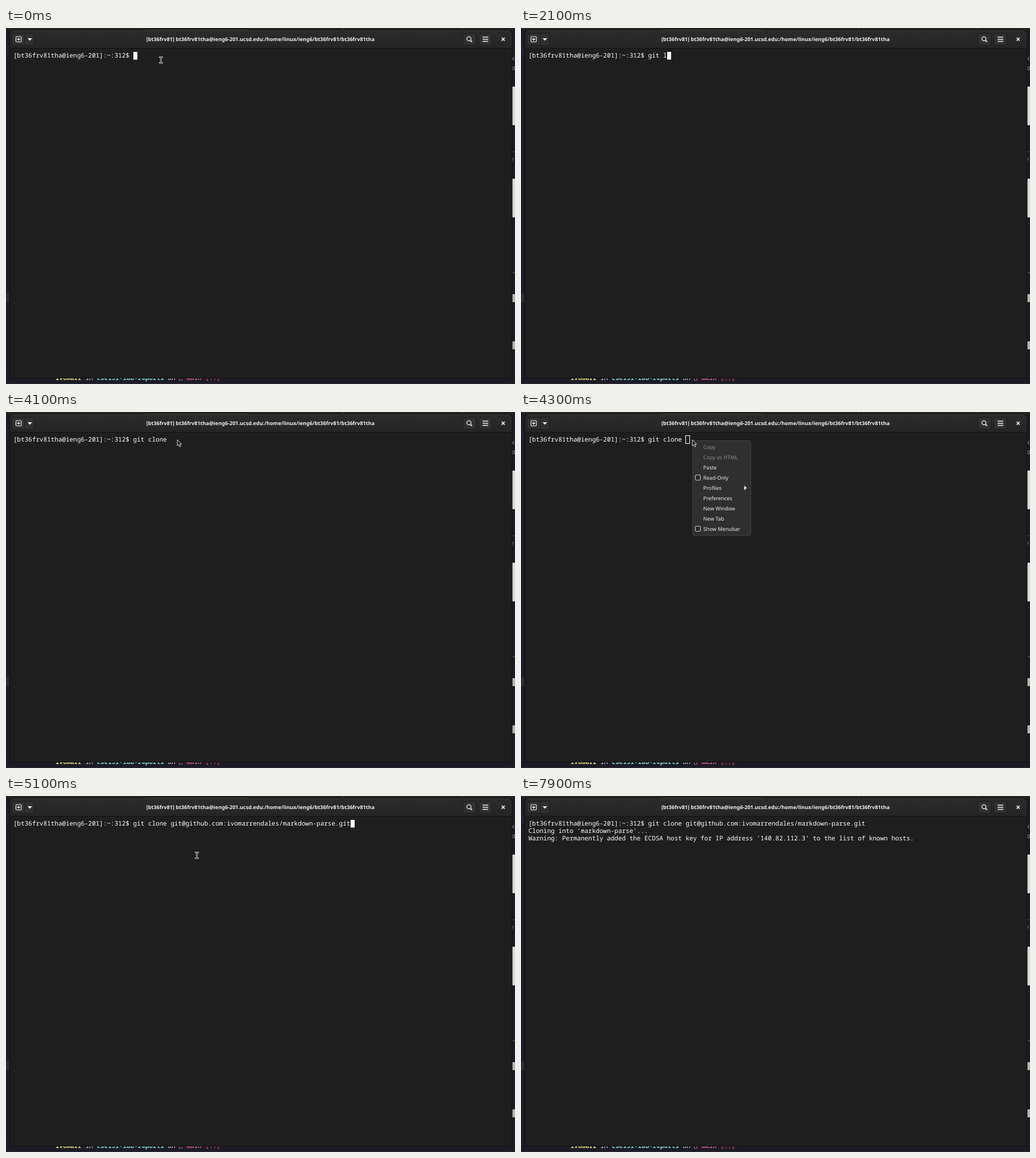
An HTML page for the animation above (8000 ms loop, 895 px wide and 626 px high).

```html
<!DOCTYPE html>
<html lang="en">
<head>
<meta charset="utf-8">
<title>Terminal</title>
<style>
  html, body { margin: 0; width: 100%; height: 100%; overflow: hidden; background: #1b1c26; }
  svg { display: block; }
  text { white-space: pre; text-rendering: geometricPrecision; }
  .mono { font: 10.98px "Noto Sans Mono", "DejaVu Sans Mono", monospace; fill: #fff; }
  .ui { font: 9.15px "Noto Sans", "Open Sans", sans-serif; fill: #eeeeec; }
  .title { font-size: 9.07px; font-weight: 700; text-anchor: middle; }
  .dim { fill: #8b8b89; }
  .bold { font-weight: 700; }
  .icon { fill: none; stroke: #eeeeec; }
  .button { fill: #303030; stroke: #1a1a1a; }
</style>
</head>
<body>
<svg width="895" height="626" viewBox="0 0 895 626">
  <defs>
    <linearGradient id="header" x1="0" y1="0" x2="0" y2="1">
      <stop offset="0" stop-color="#2b2b2b"/><stop offset="1" stop-color="#252525"/>
    </linearGradient>
  </defs>

  <!-- desktop behind the window -->
  <rect width="895" height="626" fill="#1b1c26"/>
  <rect width="895" height="4" fill="#232323"/>
  <path d="M244 3.5H425" stroke="#555"/>
  <path d="M593.5 0V4M802.5 0V4M36.5 0V2" stroke="#484848"/>
  <rect y="30" width="7" height="18" fill="#20222f"/>
  <rect y="466" width="7" height="17" fill="#2a2b36"/>
  <path d="M0 602.5H7M0 625.5H895" stroke="#272833"/>
  <g fill="#d9d9d9">
    <rect x="890" y="103" width="5" height="68"/>
    <rect x="890" y="265" width="5" height="68"/>
    <rect x="890" y="468" width="5" height="14" fill="#b5b5b0"/>
    <rect x="890" y="551" width="5" height="14" fill="#b5b5b0"/>
  </g>
  <path d="M890 430.5H895" stroke="#a33ba8"/>
  <path d="M890 217.5H895" stroke="#44454f"/>
  <g class="mono" style="fill:#a9aab4">
    <text x="888" y="57">ke</text><text x="889.5" y="74">o</text><text x="887.5" y="236">/</text>
  </g>
  <g class="mono" id="prompt"></g>

  <!-- window -->
  <path d="M6.5 615.5V10a6 6 0 0 1 6-6H884a6 6 0 0 1 6 6V615.5Z" fill="#1e1e1e" stroke="#0e0e10"/>
  <path d="M7 36V10.5a6 6 0 0 1 6-6H883.500a6 6 0 0 1 6 6V36Z" fill="url(#header)"/>
  <path d="M12 5H884" stroke="#383838"/>
  <path d="M7 35.500H889.500" stroke="#121212"/>
  <rect class="button" x="10.500" y="9.500" width="39.500" height="21" rx="3.500"/>
  <path d="M33.500 10V30" stroke="#1a1a1a"/>
  <rect class="button" x="803.500" y="9.500" width="23" height="21" rx="3.500"/>
  <rect class="button" x="831.500" y="9.500" width="23" height="21" rx="3.500"/>
  <rect class="icon" x="17.500" y="15" width="9.500" height="9.500" rx="1.500" stroke-width="1.200"/>
  <path class="icon" d="M22.250 17V22.500M19.500 19.750H25" stroke-width="1.300"/>
  <path d="M38 18H46L42 22.300Z" fill="#eeeeec"/>
  <circle class="icon" cx="814" cy="19" r="3.600" stroke-width="1.400"/>
  <path class="icon" d="M816.600 21.600L819.500 24.500" stroke-width="1.800"/>
  <path class="icon" d="M838 16H848M838 19.750H848M838 23.500H848" stroke-width="1.700"/>
  <path class="icon" d="M871.600 17.200L876.800 22.400M876.800 17.200L871.600 22.400" stroke-width="1.700"/>
  <text class="ui title" x="447.500" y="23">[bt36frv81] bt36frv81tha@ieng6-201.ucsd.edu:/home/linux/ieng6/bt36frv81/bt36frv81tha</text>

  <!-- terminal -->
  <g class="mono">
    <text id="line0" x="13" y="52"></text>
    <text id="line1" x="13" y="65.200"></text>
    <text id="line2" x="13" y="78.400"></text>
  </g>
  <rect id="caret"/>

  <g id="menu">
    <rect x="302" y="50.500" width="102" height="166.500" rx="3" fill="#2f2f2f" stroke="#454545"/>
    <rect id="hover" x="302.500" y="88.500" width="101.500" height="17.500" fill="#15539e"/>
    <g id="items"></g>
    <path d="M392.500 129.500V137.500L397 133.500Z" fill="#eeeeec"/>
  </g>

  <g id="arrow">
    <path d="M0 0V10.600L2.400 8.500L4.200 12.300L6 11.500L4.300 7.700H7.400Z" fill="#151515" stroke="#f2f2f2" stroke-width=".9" stroke-linejoin="round"/>
  </g>
  <g id="beam" fill="none">
    <path d="M-3.200 -5H3.200M-3.200 5H3.200M0 -5V5" stroke="#e8e8e8" stroke-width="2.400"/>
    <path d="M-2.700 -5H2.700M-2.700 5H2.700M0 -5V5" stroke="#151515" stroke-width=".9"/>
  </g>
</svg>
<script>
const LOOP = 8000, CELL = 6.587, ROW = 13.2, LEFT = 13;
const PROMPT = '[bt36frv81tha@ieng6-201]:~:312$ ';
const COMMAND = 'git clone git@github.com:ivomarrendales/markdown-parse.git';
const CLONING = "Cloning into 'markdown-parse'...";
const WARNING = "Warning: Permanently added the ECDSA host key for IP address '140.82.112.3' to the list of known hosts.";

const $ = id => document.getElementById(id);
function add(parent, tag, attrs, text = '') {
  const node = document.createElementNS('http://www.w3.org/2000/svg', tag);
  for (const key in attrs) node.setAttribute(key, attrs[key]);
  node.textContent = text;
  parent.append(node);
}

const promptParts = [
  [0, 'ivomarr', '#e6e06a', 1], [8, 'in', '#d8d8d8', 0], [11, 'cse15l-lab-reports', '#7fd6e2', 1],
  [30, 'on', '#d8d8d8', 0], [35, 'main', '#d2568f', 1], [40, '[!?]', '#d23a4c', 1]
];
for (const [col, text, fill, bold] of promptParts)
  add($('prompt'), 'text', { x: 87 + col * CELL, y: 618.5, style: `fill:${fill}`, class: bold ? 'bold' : '' }, text);
add($('prompt'), 'rect', { x: 304.5, y: 610.5, width: 5, height: 9, fill: 'none', stroke: '#b04f80' });

const items = ['Copy', 'Copy as HTML', 'Paste', 'Read-Only', 'Profiles', 'Preferences', 'New Window', 'New Tab', 'Show Menubar'];
items.forEach((label, i) => {
  const mid = 62 + i * 18;
  add($('items'), 'text', { x: 320.5, y: mid + 3.2, class: i < 2 ? 'ui dim' : 'ui' }, label);
  if (i === 3 || i === 8)
    add($('items'), 'rect', { x: 306.5, y: mid - 5.2, width: 9, height: 9, rx: 1.5, fill: '#292929', stroke: '#d8d8d6' });
});

// Each step changes only the listed parts of the state before it.
const at = (pointer, x, y) => ({ pointer, x, y });
const type = typed => ({ typed, caret: 'block' });
const off = { caret: 'none' };
const on = { caret: 'block' };
const steps = [
  [0, { typed: '', out: [], caret: 'block', menu: false, hover: false, ...at('beam', 272.5, 56.2) }],
  [500, off],
  [800, { ...type('g'), pointer: 'none' }],
  [900, type('gi')],
  [1000, type('git')],
  [1100, type('git ')],
  [1300, type('git l')],
  [1400, type('git lc')],
  [1600, type('git lco')],
  [1700, type('git lcon')],
  [1900, type('git lco')],
  [2000, type('git lc')],
  [2100, type('git l')],
  [2300, type('git ')],
  [2500, type('git c')],
  [2800, type('git clo')],
  [2900, type('git clone')],
  [3100, type('git clone ')],
  [3600, { ...off, ...at('beam', 270, 52) }],
  [3900, at('beam', 280, 51)],
  [4000, at('beam', 294, 52)],
  [4100, at('arrow', 301.3, 48.8)],
  [4300, { caret: 'hollow', menu: true }],
  [4400, at('arrow', 303, 54.5)],
  [4600, at('arrow', 322, 83)],
  [4700, { hover: true, ...at('arrow', 335.4, 102.5) }],
  [5100, { ...type(COMMAND), menu: false, hover: false, ...at('beam', 335.5, 104.2) }],
  [5300, at('beam', 385, 112)],
  [5400, at('beam', 455, 121)],
  [5500, at('beam', 487.5, 124)],
  [5700, off],
  [6300, { ...on, pointer: 'none' }],
  [6800, off],
  [7400, on],
  [7500, { out: [CLONING] }],
  [7900, { ...off, out: [CLONING, WARNING] }]
];
let last = {};
const states = steps.map(([time, change]) => ({ time, state: last = { ...last, ...change } }));

const show = (id, visible) => $(id).setAttribute('visibility', visible ? 'visible' : 'hidden');

function drawCaret(s) {
  const col = s.out.length ? 0 : PROMPT.length + s.typed.length;
  const row = s.out.length ? s.out.length + 1 : 0;
  const x = Math.round(LEFT + col * CELL), y = Math.round(42 + row * ROW);
  const hollow = s.caret === 'hollow';
  const box = hollow
    ? { x: x - .5, y: y - .5, width: 7, height: 14, fill: 'none', stroke: '#fff' }
    : { x, y, width: 7, height: 13.5, fill: '#fff', stroke: 'none' };
  for (const key in box) $('caret').setAttribute(key, box[key]);
  show('caret', s.caret !== 'none');
}

function draw(s) {
  $('line0').textContent = PROMPT + s.typed;
  $('line1').textContent = s.out[0] || '';
  $('line2').textContent = s.out[1] || '';
  drawCaret(s);
  show('menu', s.menu);
  show('hover', s.hover);
  for (const id of ['arrow', 'beam']) {
    show(id, s.pointer === id);
    $(id).setAttribute('transform', `translate(${s.x} ${s.y})`);
  }
}

const start = performance.now();
let shown;
function tick(now) {
  const t = Math.max(0, now - start) % LOOP;
  const { state } = states.findLast(step => step.time <= t);
  if (state !== shown) draw(shown = state);
  requestAnimationFrame(tick);
}
tick(start);
</script>
</body>
</html>
```
